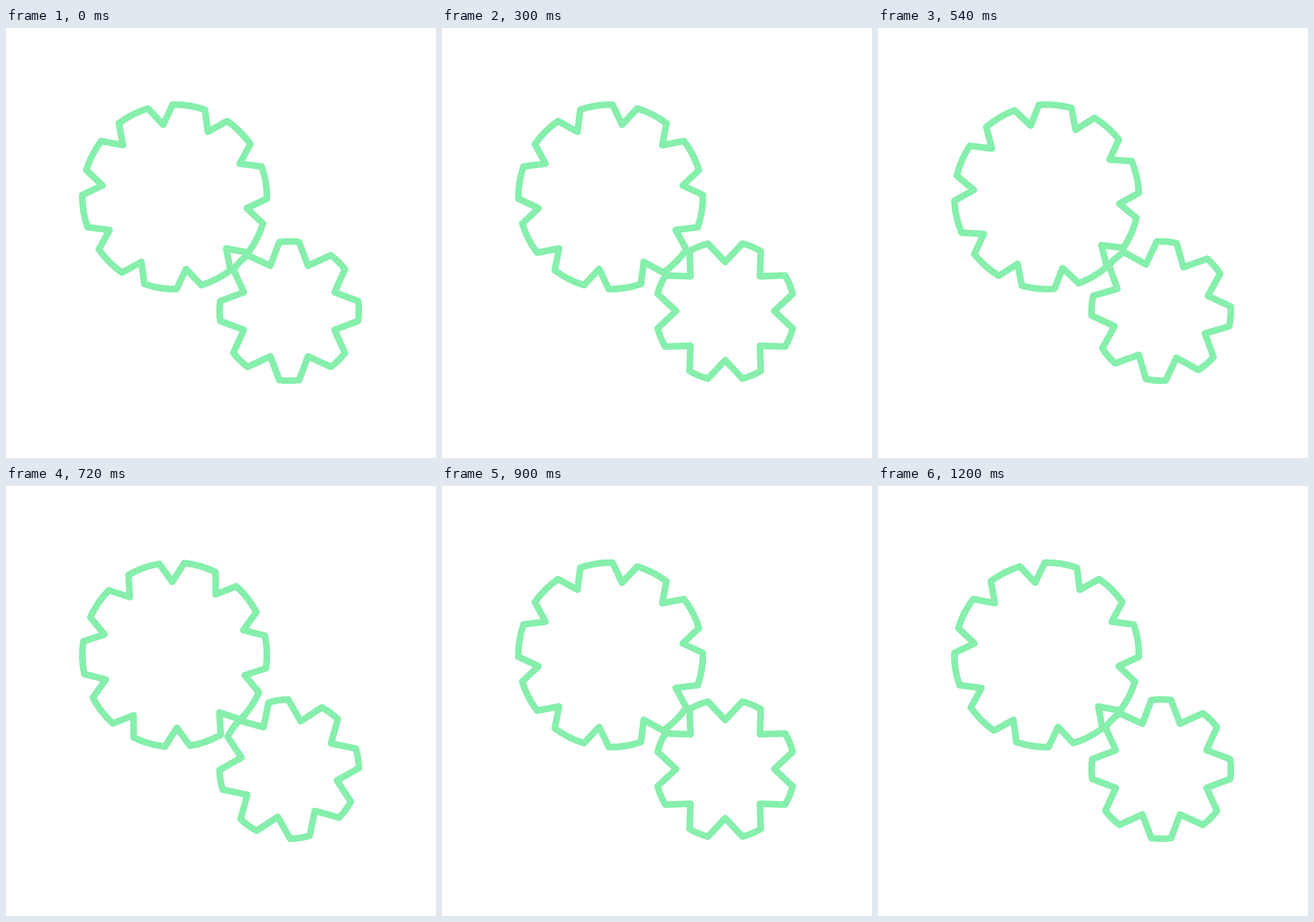
These frames come from a looping animation (748 px wide and 748 px high, 1260 ms). An HTML page with a canvas:

```html
<!DOCTYPE html>
<html lang="en">
<head>
<meta charset="utf-8">
<title>Turning gears</title>
<style>
  html, body { margin: 0; width: 100%; height: 100%; overflow: hidden; background: #fff; }
  canvas { display: block; }
</style>
</head>
<body>
<canvas id="stage" width="748" height="748"></canvas>
<script>
const ctx = document.getElementById('stage').getContext('2d');
const LOOP = 1260, STEP = 30, LAST_STEP = 40;
const rad = deg => deg * Math.PI / 180;

// Angles are in degrees; start is the angle of one tooth's middle, turn is degrees per step.
const gears = [
  { x: 293.3, y: 293.7, teeth: 10, tip: 160.5, root: 127, half: 10.2, start: 9, turn: 1.8 },
  { x: 492.6, y: 492.4, teeth: 8, tip: 121.2, root: 85.4, half: 8.2, start: 0, turn: -2.25 }
];

function drawGear({ x, y, teeth, tip, root, half, start, turn }, step) {
  const pitch = 360 / teeth;
  ctx.save();
  ctx.translate(x, y);
  ctx.rotate(rad(start + turn * step - 90));
  ctx.beginPath();
  for (let i = 0; i < teeth; i++) {
    const mid = i * pitch, valley = rad(mid + pitch / 2);
    ctx.arc(0, 0, tip, rad(mid - half), rad(mid + half));
    ctx.lineTo(root * Math.cos(valley), root * Math.sin(valley));
  }
  ctx.closePath();
  ctx.stroke();
  ctx.restore();
}

function draw(now) {
  const step = Math.min(Math.floor((now % LOOP) / STEP), LAST_STEP);
  ctx.fillStyle = '#fff';
  ctx.fillRect(0, 0, 748, 748);
  ctx.strokeStyle = '#86efac';
  ctx.lineWidth = 11.5;
  ctx.lineJoin = 'round';
  gears.forEach(gear => drawGear(gear, step));
}

const begin = performance.now();
function tick() {
  draw(performance.now() - begin);
  requestAnimationFrame(tick);
}
tick();
</script>
</body>
</html>
```
